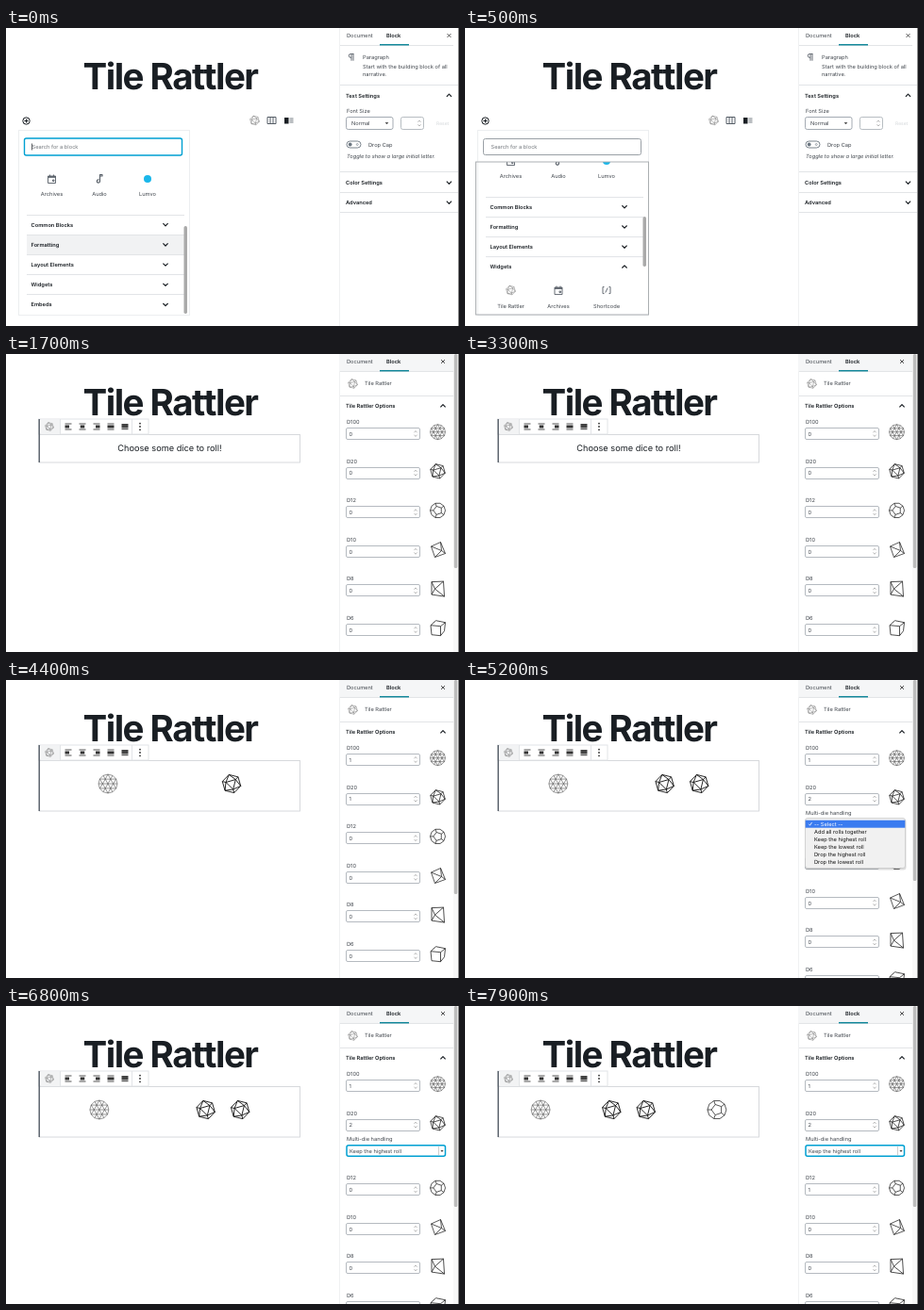
Write an HTML page that moves like this. It is 480x316 px and loops after 8000 ms.

```html
<!DOCTYPE html>
<html lang="en">
<head>
<meta charset="utf-8">
<title>Block editor demo</title>
<style>
html, body { margin: 0; width: 100%; height: 100%; overflow: hidden; background: #fff; }
svg { display: block; width: 480px; height: 316px; font-family: Inter, "Open Sans", sans-serif; text-rendering: geometricPrecision; }
</style>
</head>
<body>
<svg id="stage" viewBox="0 0 480 316" xmlns="http://www.w3.org/2000/svg"></svg>
<script>
const LOOP = 8000;
const NAME = 'Tile Rattler';
const INK = '#191e23', GREY = '#555d66', LINE = '#e2e4e7', BLUE = '#00a0d2', FIELD = '#adb3b9';

// Drawing helpers; text y is the optical middle of the line
const text = (x, y, s, o = {}) => {
  const { size = 5.7, weight = 400, fill = '#40464d', anchor = 'start', extra = '' } = o;
  return `<text x="${x}" y="${y + size * 0.36}" font-size="${size}" font-weight="${weight}" fill="${fill}" text-anchor="${anchor}" ${extra}>${s}</text>`;
};
const bold = (x, y, s) => text(x, y, s, { weight: 600, fill: INK });
const mid = (x, y, s, o) => text(x, y, s, { anchor: 'middle', ...o });
const rect = (x, y, w, h, fill, stroke = 'none', r = 0, sw = 1, opacity = 1) =>
  `<rect x="${x}" y="${y}" width="${w}" height="${h}" rx="${r}" fill="${fill}" stroke="${stroke}" stroke-width="${sw}" opacity="${opacity}"/>`;
const path = (x, y, d, sw = 1, stroke = GREY, fill = 'none') =>
  `<path transform="translate(${x} ${y})" d="${d}" fill="${fill}" stroke="${stroke}" stroke-width="${sw}" stroke-linejoin="round"/>`;
const dot = (x, y, r, fill) => `<circle cx="${x}" cy="${y}" r="${r}" fill="${fill}"/>`;
const hline = (x, y, w, fill = LINE) => rect(x, y, w, 1, fill);
const chevron = (x, y, up) => path(x, y, up ? 'M-2.6 1.3L0-1.3 2.6 1.3' : 'M-2.6-1.3L0 1.3 2.6-1.3', 1.2, INK);
const spinner = (x, y) => path(x, y, 'M-1.5-1.2L0-3 1.5-1.2M-1.5 1.2L0 3 1.5 1.2', 0.6, '#888');

// Dice
const polar = (r, deg) => [r * Math.cos(deg * Math.PI / 180), r * Math.sin(deg * Math.PI / 180)];
const ring = (n, r, a) => Array.from({ length: n }, (_, i) => polar(r, a + i * 360 / n));
const pt = p => p[0].toFixed(2) + ' ' + p[1].toFixed(2);
const loop = ps => 'M' + ps.map(pt).join('L') + 'Z';
const seg = (a, b) => 'M' + pt(a) + 'L' + pt(b);

function d20Path(r) {
  const out = ring(6, r, 74), inn = ring(3, r * 0.62, 74);
  let d = loop(out) + loop(inn);
  inn.forEach((p, i) => [-1, 0, 1].forEach(k => d += seg(p, out[(i * 2 + k + 6) % 6])));
  return d;
}
function d100Path(r) {
  const out = ring(12, r, 0), inn = ring(6, r * 0.56, 0);
  let d = loop(out) + loop(inn);
  inn.forEach((p, i) => {
    d += seg([0, 0], p);
    [-1, 0, 1].forEach(k => d += seg(p, out[(i * 2 + k + 12) % 12]));
  });
  return d;
}
function d12Path(r) {
  const out = ring(10, r, 180), inn = ring(5, r * 0.58, 180);
  return loop(out) + loop(inn) + inn.map((p, i) => seg(p, out[i * 2])).join('');
}
const DICE = {
  D100: (x, y, r) => path(x, y, d100Path(r), 0.55, '#444'),
  D20: (x, y, r) => path(x, y, d20Path(r), r / 11, '#111'),
  D12: (x, y, r) => path(x, y, d12Path(r), 0.75, '#222'),
  D10: (x, y) => path(x, y, 'M-7-3.5L3-8 8 4-3 8ZM-7-3.5L4 1 3-8M4 1L8 4M4 1L-3 8', 0.75, '#222'),
  D8: (x, y) => path(x, y, 'M-6.5-7.5L6-8 7 8-6.5 6ZM-6.5-7.5L-3 0 6-8M7 8L-3 0-6.5 6', 0.8, '#222'),
  D6: (x, y) => path(x, y, 'M-7.5-3L3-2 3 8-6.5 7ZM-7.5-3L-2-8 8-6 3-2M8-6L7 3 3 8', 0.8, '#222')
};
const smallDie = (x, y, r = 5) => path(x, y, d20Path(r), 0.5, '#777');

// Block icons, centred on 0,0
const ICONS = {
  cal: 'M-4-3H4V4.5H-4ZM-4-1.6H4M-4-2.5H4M-2-4.5V-3M2-4.5V-3M1 1H2.5V2.5H1Z',
  note: 'M.5 2.5V-4.5H3V-3H.5M.5 2.5A1.6 1.6 0 1 1-.5 1',
  code: 'M-2.5-3.5H-4V3.5H-2.5M2.5-3.5H4V3.5H2.5M1.2-2.5L-1.2 2.5',
  grid: 'M-3.5-3H3.5V3.5H-3.5ZM-3.5-1H3.5M-3.5 1H3.5M-1.2-3V3.5M1.2-3V3.5M-2-4V-3M2-4V-3',
  shapes: 'M0-4.5L2-1H-2ZM-4 .8H-1V3.8H-4ZM1 2.3A1.6 1.6 0 1 0 4.2 2.3 1.6 1.6 0 1 0 1 2.3',
  comment: 'M-4-4H4V4L2 2.3H-4ZM-2.5-2.2H2.5M-2.5-.8H2.5M-2.5 .6H2.5',
  list: 'M-4-4H4V4H-4ZM-2.5-2H-1.5M-.5-2H2.5M-2.5 0H-1.5M-.5 0H2.5M-2.5 2H-1.5M-.5 2H2.5',
  rss: 'M-3-3.5A6.5 6.5 0 0 1 3.5 3.5M-3-.8A4 4 0 0 1 .8 3.5M-2.8 2.5V3.3',
  search: 'M-2.5-1.2A2 2 0 1 0 1.5-1.2 2 2 0 1 0-2.5-1.2M1 .3L3.5 3'
};
const WIDGETS = [
  [NAME, null], ['Archives', 'cal'], ['Shortcode', 'code'],
  ['Calendar', 'grid'], ['Categories', 'shapes'], ['Latest Comments', 'comment'],
  ['Latest Posts', 'list'], ['RSS', 'rss'], ['Search', 'search']
];
const COLS = [48.5, 99, 150], ROWS = [297, 337, 386];
const SECTIONS = ['Common Blocks', 'Formatting', 'Layout Elements', 'Widgets', 'Embeds'];

const T = { open: 400, scrolled: 800, pick: 900, insert: 1400, menu: 5000, chosen: 6300 };
const HOVER = [[0, 1], [200, 2], [300, 3], [T.open, -1]];
const COUNTS = { D100: [[0, 0], [3400, 1]], D20: [[0, 0], [3900, 1], [4500, 2]], D12: [[0, 0], [7300, 1]] };
const MENU_ROW = [[0, 0], [5600, 1], [5800, 2], [6100, -1], [6200, 2]];
const CHOICES = ['-- Select --', 'Add all rolls together', 'Keep the highest roll',
  'Keep the lowest roll', 'Drop the highest roll', 'Drop the lowest roll'];

const at = (steps, t) => steps.filter(s => s[0] <= t).pop()[1];
const ease = (t, a, b) => {
  const p = Math.min(1, Math.max(0, (t - a) / (b - a)));
  return p * p * (3 - 2 * p);
};

function frame(editing) {
  return mid(174, 51.5, NAME, { size: 38.5, weight: 700, fill: INK, extra: 'letter-spacing="-1.5"' }) +
    rect(353, 0, 1, 316, '#f0f1f2') +
    (editing ? rect(353, 0, 121, 18, '#f5f6f7') : '') +
    text(361, 8, 'Document') + bold(403, 8, 'Block') +
    path(editing ? 463 : 469.5, 8, 'M-2-2L2 2M2-2L-2 2', 0.9, '#444') +
    hline(354, 18, 120) + rect(396, 17, 31, 1.5, '#168a9c');
}

function inserter(t) {
  const open = t >= T.open, picked = t >= T.pick;
  const s = ease(t, T.open, T.scrolled);
  const hover = at(HOVER, t);
  let list = path(COLS[0], 160, ICONS.cal, 0.9) + path(COLS[1], 160, ICONS.note, 1.1) + dot(COLS[2], 160, 4, '#1ab7ea');
  ['Archives', 'Audio', 'Lumvo'].forEach((n, i) => list += mid(COLS[i], 176, n));
  SECTIONS.forEach((n, i) => {
    const y = 208.5 + 21.2 * i + (open && i === 4 ? 150 : 0);
    if (hover === i) list += rect(22, y - 10, 167, 21, '#f1f2f3');
    list += hline(22, Math.round(y - 11), 167) + bold(26.5, y, n) + chevron(169, y, open && i === 3);
  });
  if (open) {
    if (picked) list += rect(26, 287, 45.5, 33.5, '#eef0f0', 'none', 1);
    WIDGETS.forEach(([n, icon], i) => {
      const x = COLS[i % 3], y = ROWS[i / 3 | 0];
      list += icon ? path(x, y, ICONS[icon], 0.9) : smallDie(x, y);
      const lines = n.length > 13 ? n.split(' ') : [n];
      lines.forEach((l, k) => list += mid(x, y + 17 + 6.5 * k, l));
    });
  }
  const thumb = open ? [195 + 31 * s, 53] : [210, 93];
  return (picked ? rect(35, 83.5, 277, 1.3, '#3f8fb5') : '') +
    `<circle cx="21.5" cy="98.5" r="3.7" fill="none" stroke="${INK}"/>` + path(21.5, 98.5, 'M-2 0H2M0-2V2', 1, INK) +
    smallDie(263.5, 98) + path(281.5, 98, 'M-4.5-3.5H4.5V3.5H-4.5ZM-1.5-3.5V3.5M1.5-3.5V3.5', 1) +
    rect(295, 95, 4.5, 6.5, INK) + path(302.5, 98, 'M-2-2H2M-2 0H2M-2 2H2', 0.8) +
    rect(13.5, 108.5, 181, 196, '#fff', '#eceef0') +
    (open ? rect(19.5, 117.5, 167, 17, '#fff', '#9aa0a6', 2)
          : rect(19.5, 117, 167, 18, '#fff', BLUE, 2, 1.4) + rect(27, 122.5, 0.7, 7, INK)) +
    text(27.5, 126, 'Search for a block', { fill: '#72777c' }) +
    '<clipPath id="list"><rect x="12" y="142" width="182" height="162"/></clipPath>' +
    `<g clip-path="url(#list)"><g transform="translate(0 ${(-119 * s).toFixed(2)})">${list}</g></g>` +
    rect(188.5, thumb[0], 3.5, thumb[1], '#aaa', 'none', 1.7) +
    (open ? rect(11.5, 142, 183, 162, 'none', '#a3a7ab', 0, 0.9) : '');
}

function paragraphPanel() {
  const divider = y => hline(354, y, 126);
  return path(366, 31, 'M2.5-3.5H-.8A1.8 1.8 0 0 0-.8 .3H0M0-3.5V3.7M2-3.5V3.7', 0.9) +
    text(378, 30.5, 'Paragraph') +
    text(378, 41, 'Start with the building block of all') + text(378, 49, 'narrative.') +
    divider(60) + bold(360, 71.5, 'Text Settings') + chevron(469.5, 71.5, true) +
    text(361, 88, 'Font Size') +
    rect(360.5, 94.5, 49.5, 13, '#fff', '#8d96a0', 2, 0.8) + text(366, 101, 'Normal') +
    path(403.5, 101, 'M-1.5-.8H1.5L0 1Z', 0.3, '#333', '#333') +
    rect(418.5, 94.5, 24, 13, '#fff', '#a5acb3', 2, 0.8) + spinner(438, 101) +
    text(456, 101, 'Reset', { size: 5, fill: '#d5d8db' }) +
    rect(361, 120, 15, 7, '#fff', '#6c7781', 3.5, 0.9) + dot(364.7, 123.5, 1.9, '#6c7781') +
    '<circle cx="372.3" cy="123.5" r="1" fill="none" stroke="#6c7781" stroke-width=".6"/>' +
    text(384, 123.5, 'Drop Cap') +
    text(361, 135.5, 'Toggle to show a large initial letter.', { extra: 'font-style="italic"' }) +
    divider(152) + bold(360, 164, 'Color Settings') + chevron(469.5, 164) +
    divider(174) + bold(360, 185, 'Advanced') + chevron(469.5, 185) + divider(195);
}

function toolbar() {
  let out = rect(34.5, 69, 116.5, 16, '#fff', LINE) + rect(37, 70, 20, 15, '#f2f3f4') + smallDie(46, 77, 4.5) +
    rect(57, 69, 1, 16, LINE) + rect(133, 69, 1, 16, LINE);
  // left, centre, right, wide, full
  [-1, 0, 1, 0, 0].forEach((side, i) => {
    const x = 66 + 15 * i, w = i > 2 ? 7 : 4.5;
    const bx = side < 0 ? x - 3.5 : side > 0 ? x + 3.5 - w : x - w / 2;
    out += i === 4 ? rect(x - 3.5, 74, 7, 4.5, '#444') + rect(x - 3.5, 79.2, 7, 1, '#444')
      : rect(x - 3.5, 73.5, 7, 1, '#555') + rect(bx, 75.5, w, 3, '#333') + rect(x - 3.5, 79.5, 7, 1, '#555');
  });
  [73.7, 77, 80.3].forEach(y => out += dot(142, y, 0.9, '#333'));
  return out;
}

// Groups of dice share the row with equal space around each group
function diceRow(counts) {
  const groups = Object.entries(counts).filter(g => g[1]);
  const h = groups.length ? 54 : 30, cell = 36.5;
  let out = rect(35.5, 85.5, 276, h - 0.5, '#fff', '#d3d6d9', 0, 0.9);
  if (!groups.length) out += mid(173.5, 100, 'Choose some dice to roll!', { size: 9.2, fill: INK });
  const total = groups.reduce((n, g) => n + g[1], 0);
  const gap = (262 - cell * total) / groups.length;
  let x = 42.5 + gap / 2;
  groups.forEach(([die, n]) => {
    for (let i = 0; i < n; i++, x += cell) out += DICE[die](x + cell / 2, 110, 10);
    x += gap;
  });
  return out + toolbar() + rect(34.5, 69, 1.4, 16 + h, GREY);
}

function menu(row) {
  let out = rect(360.5, 147.5, 107, 54, '#777', 'none', 3, 0, 0.25) +
    rect(360.5, 146.5, 106, 53, '#f1f1f1', '#c6c6c6', 2.5, 0.7);
  CHOICES.forEach((c, i) => {
    const y = 152.7 + 8.1 * i, on = row === i, fill = on ? '#fff' : '#111';
    if (on) out += rect(360.7, y - 4, 105.6, 8, '#3a7bf0');
    if (!i) out += path(366, y, 'M-1.6 0L-.5 1.5 1.6-1.8', 0.8, fill);
    out += text(370, y, c, { fill });
  });
  return out;
}

function dicePanel(t, counts) {
  const multi = counts.D20 > 1, chosen = t >= T.chosen;
  let out = smallDie(367.5, 31.5) + text(380, 31, NAME) + hline(354, 44, 120) +
    bold(360, 55, NAME + ' Options') + chevron(463, 55, true);
  Object.keys(DICE).forEach((die, i) => {
    const y = 72 + 41.6 * i + (multi && i > 1 ? 27 : 0);
    out += text(361, y, die) + rect(360.5, Math.round(y + 6) + 0.5, 78, 12, '#fff', FIELD, 1.5, 0.9) +
      text(363.5, y + 12.7, counts[die] || 0) + spinner(434, y + 12.5) +
      DICE[die](457.5, y + 10.7, 8);
  });
  if (multi) {
    out += text(361, 141, 'Multi-die handling') +
      rect(361, 147.8, 104.5, 11.5, '#fff', chosen ? BLUE : FIELD, 2, chosen ? 1.5 : 0.8) +
      text(364, 153.7, CHOICES[chosen ? 2 : 0]) + rect(458, 149, 0.7, 9.5, '#bbb') +
      path(462, 153.7, 'M-1.3-.7H1.3L0 1Z', 0.2, '#333', '#333');
    if (t >= T.menu && !chosen) out += menu(at(MENU_ROW, t));
  }
  return out + rect(474, 0, 5, 316, '#f8f8f8') + rect(474.8, 0, 3.5, multi ? 213 : 227, '#bcbcbc', 'none', 1.5);
}

function scene(t) {
  const editing = t >= T.insert;
  let body;
  if (editing) {
    const counts = {};
    for (const die in COUNTS) counts[die] = at(COUNTS[die], t);
    body = diceRow(counts) + dicePanel(t, counts);
  } else body = inserter(t) + paragraphPanel();
  return rect(0, 0, 480, 316, '#fff') + frame(editing) + body + rect(479, 0, 1, 316, '#8a8a8a');
}

const stage = document.getElementById('stage');
const start = performance.now();
let shown = '';
function tick() {
  const markup = scene((performance.now() - start) % LOOP);
  if (markup !== shown) stage.innerHTML = shown = markup;
  requestAnimationFrame(tick);
}
tick();
</script>
</body>
</html>
```
